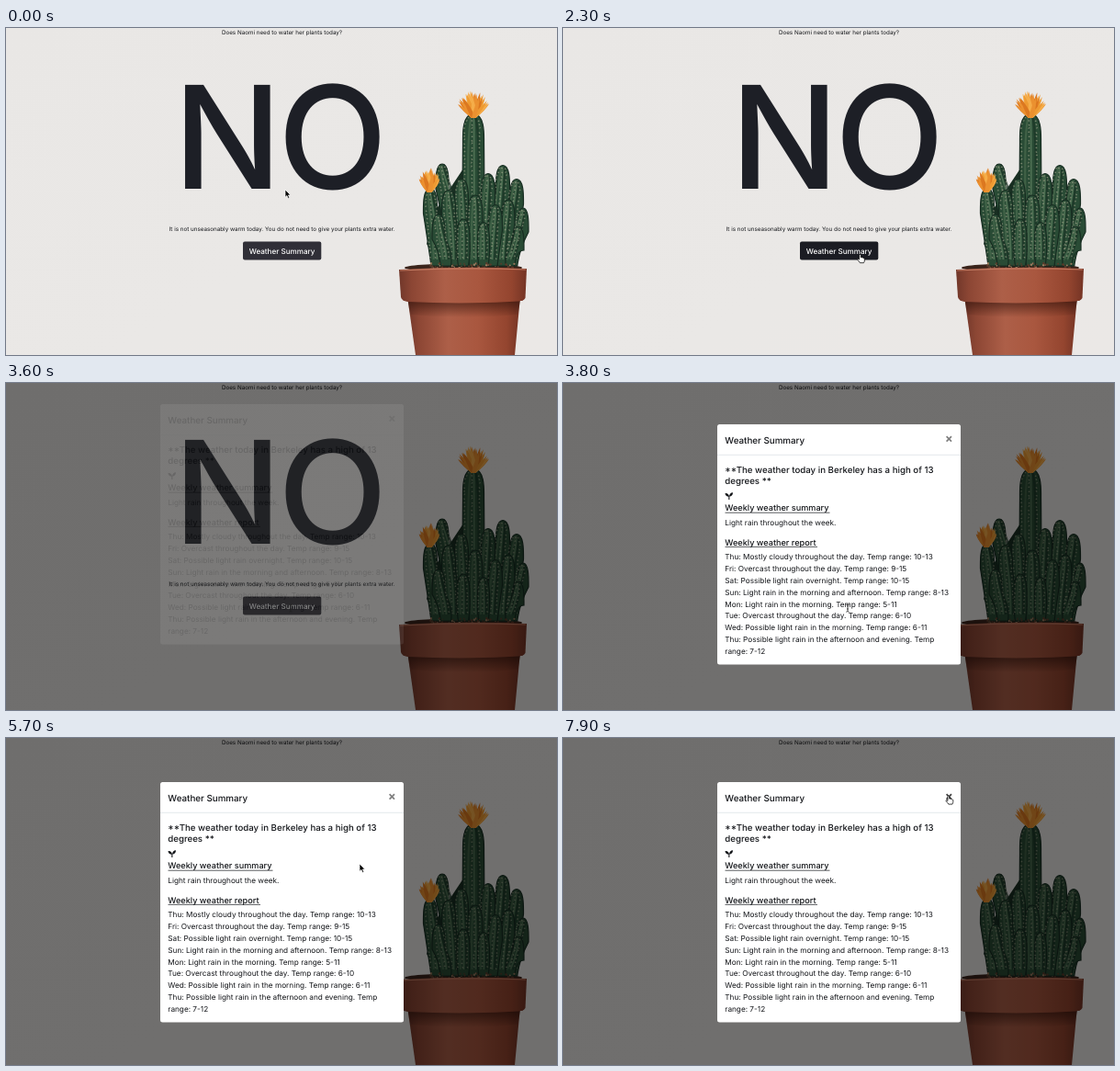
Recreate the animation shown at these times as an HTML page. Size 600 px wide and 356 px high, loop 8 s.

```html
<!DOCTYPE html>
<html lang="en">
<head>
<meta charset="utf-8">
<title>Plant watering</title>
<style>
  html, body { margin: 0; width: 100%; height: 100%; overflow: hidden; background: #e9e7e5; }
  svg { display: block; width: 100%; height: 100%; }
  text { font-family: Inter, Roboto, "Open Sans", sans-serif; fill: #14161a; text-rendering: geometricPrecision; white-space: pre; }
  .small { font-size: 6.28px; text-anchor: middle; }
  .big { font-size: 155.5px; font-weight: 500; fill: #1d1f26; font-optical-sizing: none; }
  .label { font-size: 8.1px; font-weight: 500; fill: #fff; text-anchor: middle; }
  .title { font-size: 9.8px; font-weight: 500; }
  .head { font-size: 9.68px; font-weight: 500; }
  .sub { font-size: 9.15px; font-weight: 500; }
  .body { font-size: 8.22px; }
</style>
</head>
<body>
<svg viewBox="0 0 600 356" preserveAspectRatio="none">
  <defs>
    <linearGradient id="wall" x2="1" y2="1">
      <stop offset="0" stop-color="#e9e7e5"/><stop offset=".6" stop-color="#eae8e6"/><stop offset="1" stop-color="#ebe8e6"/>
    </linearGradient>
    <linearGradient id="clay">
      <stop offset="0" stop-color="#71372a"/><stop offset=".1" stop-color="#8c4634"/>
      <stop offset=".36" stop-color="#ad5f48"/><stop offset=".62" stop-color="#a9573f"/>
      <stop offset=".88" stop-color="#94452f"/><stop offset="1" stop-color="#743425"/>
    </linearGradient>
    <linearGradient id="shade" x2="0" y2="1">
      <stop offset="0" stop-color="#2c0f08" stop-opacity=".65"/><stop offset="1" stop-color="#2c0f08" stop-opacity="0"/>
    </linearGradient>
  </defs>

  <rect width="600" height="356" fill="url(#wall)"/>

  <g id="plant"></g>
  <g id="pot">
    <path d="M437 292 L446 356 H554 L560 292 Z" fill="url(#clay)"/>
    <path d="M437.500 296 L440 312 Q498 318 557.500 312 L560 296 Z" fill="url(#shade)"/>
    <path d="M428 263 Q498 259 567 262 L565.500 294 Q564 297 558 297.500 Q498 301 437 298 Q431 297 430 293 Z" fill="url(#clay)"/>
    <path d="M429 264 Q498 260.500 566 263" fill="none" stroke="#c27a62" stroke-width="1.200"/>
  </g>

  <text class="small" x="300.5" y="7.3">Does Naomi need to water her plants today?</text>
  <text class="big" y="175" x="182.500 296">NO</text>
  <text class="small" x="300.5" y="221.4">It is not unseasonably warm today. You do not need to give your plants extra water.</text>

  <rect id="ring" x="257" y="231.800" width="87.200" height="21.600" rx="2.800" fill="none" stroke="#52585d" stroke-opacity=".55" stroke-width="1.800"/>
  <rect id="button" x="258" y="232.600" width="85.300" height="20" rx="2"/>
  <text class="label" x="300.6" y="245.6">Weather Summary</text>

  <rect id="dim" width="600" height="356" fill="#000"/>

  <g id="modal">
    <rect x="168" y="48" width="265" height="261.500" rx="2.500" fill="#fff"/>
    <path d="M168 81.300 H433" stroke="#dee2e6" stroke-width=".8"/>
    <text class="title" x="176.300" y="68.600">Weather Summary</text>
    <path id="close" d="M417.600 61.200 l5.400 5.400 m0 -5.400 l-5.400 5.400" stroke="#000" stroke-width="1.700"/>
    <text class="head" x="176.300" y="100.500">**The weather today in Berkeley has a high of 13</text>
    <text class="head" x="176.300" y="113.300">degrees **</text>
    <g fill="#14161a">
      <path d="M176.500 123 Q180.500 122.600 180.900 126.800 Q177 127 176.500 123 Z"/>
      <path d="M185 122.200 Q185 126.300 181.100 126.400 Q181.200 122.400 185 122.200 Z"/>
      <path d="M180.300 125.500 h1.100 v4.500 h-1.100 Z"/>
    </g>
    <text class="sub" x="176.300" y="142.400">Weekly weather summary</text>
    <text class="body" x="176.300" y="158.400">Light rain throughout the week.</text>
    <text class="sub" x="176.300" y="179.600">Weekly weather report</text>
    <path d="M176.500 144.200 H290.500 M176.500 181.400 H277" stroke="#14161a" stroke-width=".7"/>
    <g id="report"></g>
  </g>

  <g id="cursor">
    <path id="arrow" d="M0 0 V8.200 L1.900 6.500 L3.200 9.400 L4.700 8.700 L3.400 5.900 H5.900 Z" fill="#000" stroke="#fff" stroke-width=".7" stroke-linejoin="round"/>
    <path id="hand" d="M-.9 .8 Q0 -.6 .9 .8 V3.400 Q2 2.700 2.500 3.700 Q3.500 3.200 3.900 4.200 Q5 4 5 5 V6.700 Q4.900 8 4.100 9.300 H0 Q-.8 7.800 -2.700 5.900 Q-3 4.700 -1.900 4.900 L-.9 5.700 Z" fill="#fff" stroke="#000" stroke-width=".75" stroke-linejoin="round"/>
    <path id="beam" d="M-1.700 -3.800 Q0 -3.800 0 -2.800 Q0 -3.800 1.700 -3.800 M0 -2.800 V3.200 M-1.700 4.200 Q0 4.200 0 3.200 Q0 4.200 1.700 4.200 M-1 1 H1" fill="none" stroke="#222" stroke-width=".8"/>
  </g>
</svg>

<script>
const NS = "http://www.w3.org/2000/svg";
const $ = id => document.getElementById(id);

function add(parent, tag, attrs, text) {
  const el = document.createElementNS(NS, tag);
  for (const key in attrs) el.setAttribute(key, attrs[key]);
  if (text) el.textContent = text;
  parent.appendChild(el);
  return el;
}

let seed = 11;
function rand() {
  seed = (seed * 16807) % 2147483647;
  return seed / 2147483647;
}

// Plant: tapered stems with ridges and pale spines, from back to front.
const stems = [
  [475, 155, 491, 14], [541, 157, 535, 15], [556, 172, 547, 15], [509, 105, 509, 23],
  [563, 202, 552, 12], [462, 182, 469, 15], [525, 166, 521, 15], [496, 172, 499, 15],
  [482, 184, 487, 15], [547, 194, 541, 14], [511, 190, 511, 16], [533, 200, 529, 15],
  [471, 210, 479, 14], [558, 222, 549, 12], [498, 215, 498, 14], [520, 218, 520, 13]
];

function drawStem([x, y, baseX, w]) {
  const h = w / 2, top = y - h, bottom = 252;
  const edge = k => `M${x + k * h * .35} ${top + 2} C${x + k * h} ${y + 8} ${baseX + k * h} ${y + 30} ${baseX + k * h * .8} ${bottom}`;
  add(plant, "path", {
    d: `M${x} ${top} C${x - h * 1.1} ${top} ${x - h} ${y + 12} ${x - h} ${y + 20}
        Q${baseX - h * 1.1} ${bottom - 10} ${baseX - h * .8} ${bottom + 7}
        H${baseX + h * .8} Q${baseX + h * 1.1} ${bottom - 10} ${x + h} ${y + 20}
        C${x + h} ${y + 12} ${x + h * 1.1} ${top} ${x} ${top} Z`,
    fill: "#294b35", stroke: "#162b20", "stroke-width": 1.2
  });
  [[-.55, "#48694d", 2.2], [.08, "#5a7b5c", 1.8], [.55, "#1b3426", 2.4]].forEach(([k, color, width]) =>
    add(plant, "path", { d: edge(k), fill: "none", stroke: color, "stroke-width": width, "stroke-opacity": .75 }));
  for (let py = top + 3; py < bottom; py += 4.2) {
    const p = (py - top) / (bottom - top);
    const cx = x + (baseX - x) * p;
    for (const k of [-.85, -.15, .6]) {
      const px = cx + k * h * Math.min(1, .4 + (py - top) / 20) + rand() - .5;
      add(plant, "path", {
        d: `M${px - 1} ${py + rand()} l2 ${rand() * 2 - 1} m-1 -1 v1.600`,
        stroke: "#c2bda3", "stroke-width": .5, "stroke-opacity": .7
      });
    }
  }
}

function drawFlower(x, y, w, h) {
  const colors = ["#dc7820", "#eb9130", "#f5ad49", "#ee9a32"];
  for (let i = 0; i < 34; i++) {
    const a = (i * 13 % 34 / 33 - .5) * 2.5;
    const len = h * (.72 + rand() * .28);
    const tx = x + Math.sin(a) * w, ty = y - Math.max(.25, Math.cos(a * .78)) * len;
    add(plant, "path", {
      d: `M${x - 2} ${y} Q${(x + tx) / 2 - 3} ${(y + ty) / 2} ${tx} ${ty} Q${(x + tx) / 2 + 4} ${(y + ty) / 2} ${x + 2} ${y} Z`,
      fill: colors[i % 4]
    });
  }
}

const plant = $("plant");
add(plant, "ellipse", { cx: 498, cy: 261, rx: 64, ry: 4.5, fill: "#3a241b" });
add(plant, "path", { d: "M470 195 L500 150 L545 175 L562 215 L552 257 H470 L458 235 Z", fill: "#192f22" });
stems.forEach(drawStem);
for (let i = 0; i < 70; i++)
  add(plant, "circle", { cx: 460 + rand() * 94, cy: 256 + rand() * 6, r: .5 + rand() * .8, fill: i % 3 ? "#5c3a2a" : "#9a7b5f" });
drawFlower(509, 98, 18, 30);
drawFlower(461, 179, 12, 27);

const report = [
  "Thu: Mostly cloudy throughout the day. Temp range: 10-13",
  "Fri: Overcast throughout the day. Temp range: 9-15",
  "Sat: Possible light rain overnight. Temp range: 10-15",
  "Sun: Light rain in the morning and afternoon. Temp range: 8-13",
  "Mon: Light rain in the morning. Temp range: 5-11",
  "Tue: Overcast throughout the day. Temp range: 6-10",
  "Wed: Possible light rain in the morning. Temp range: 6-11",
  "Thu: Possible light rain in the afternoon and evening. Temp",
  "range: 7-12"
];
report.forEach((line, i) => add($("report"), "text", { class: "body", x: 176.3, y: 195.4 + i * 12.8 }, line));

// Motion tables: time, then values.
const path = [
  [0, 304, 176], [900, 329, 212], [1200, 361, 248], [1500, 362, 250], [1800, 352, 250],
  [2200, 328, 247], [2600, 309.5, 244.5], [3500, 309.5, 244.5], [3600, 310, 245], [4500, 310, 245],
  [5400, 377, 148], [5700, 385, 137], [6300, 410, 84], [6800, 419.8, 62.8], [8000, 419.8, 62.8]
];
const kinds = [[0, "arrow"], [2000, "hand"], [3600, "beam"], [5000, "arrow"], [6700, "hand"]];
const dims = [[0, 0], [3400, 0], [3500, .2], [3600, .52], [8000, .52]];
const fades = [[0, 0, -25], [3500, 0, -25], [3600, .08, -25], [3700, .78, -11], [3800, 1, -3], [3900, 1, 0], [8000, 1, 0]];

function at(table, t) {
  const i = Math.max(1, table.findIndex(row => row[0] > t));
  const a = table[i - 1], b = table[i];
  const p = (t - a[0]) / (b[0] - a[0]);
  return a.slice(1).map((v, k) => v + (b[k + 1] - v) * p);
}

function draw(t) {
  const [x, y] = at(path, t);
  const kind = kinds.filter(k => k[0] <= t).pop()[1];
  $("cursor").setAttribute("transform", `translate(${x} ${y})`);
  for (const id of ["arrow", "hand", "beam"]) $(id).style.display = id === kind ? "" : "none";

  $("button").setAttribute("fill", t >= 2000 && t < 3600 ? "#1b1c23" : "#302f37");
  $("ring").style.display = t >= 2700 && t < 3600 ? "" : "none";
  $("dim").style.opacity = at(dims, t)[0];

  const [alpha, dy] = at(fades, t);
  $("modal").style.opacity = alpha;
  $("modal").setAttribute("transform", `translate(0 ${dy})`);
  $("close").style.opacity = t >= 6700 ? .75 : .5;
}

const start = performance.now();
function tick() {
  const t = (performance.now() - start) % 8000;
  draw(Math.floor(t / 100) * 100);
  requestAnimationFrame(tick);
}
tick();
</script>
</body>
</html>
```
